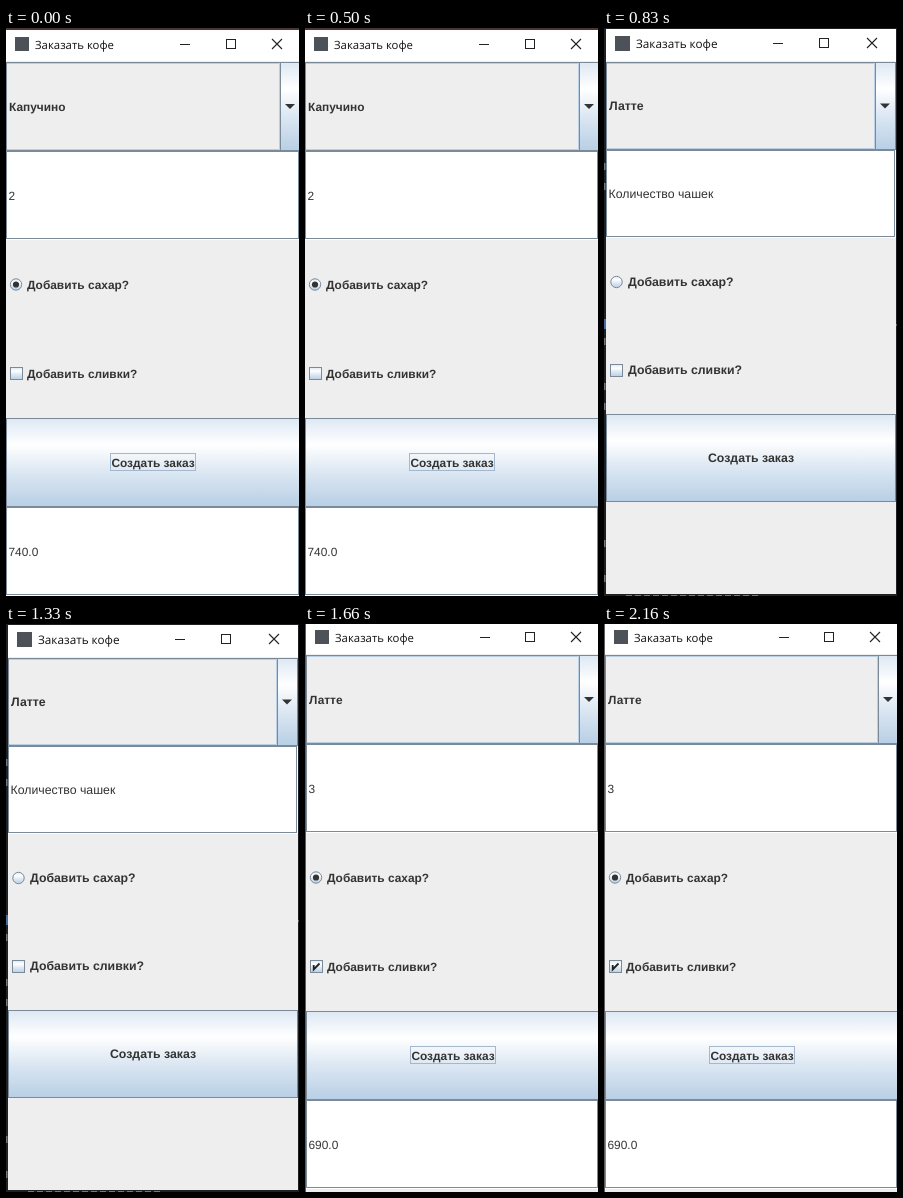
An HTML page that plays this animation: 293x568 px, repeating every 2490 ms.

```html
<!DOCTYPE html>
<html lang="ru">
<head>
<meta charset="utf-8">
<title>Заказать кофе</title>
<style>
html, body { margin: 0; width: 100%; height: 100%; overflow: hidden; background: #eee; }
svg { display: block; width: 293px; height: 568px; }
text { fill: #333; font-family: "Liberation Sans", Arial, sans-serif; text-rendering: geometricPrecision; }
.title { fill: #111; font-family: "Open Sans", "Noto Sans", sans-serif; }
.bold { font-weight: bold; }
.mid { text-anchor: middle; }
.shot { visibility: hidden; animation: show 2490ms step-end infinite; }
.shot:nth-of-type(2) { animation-delay: -1660ms; }
.shot:nth-of-type(3) { animation-delay: -830ms; }
@keyframes show {
  0% { visibility: visible; }
  33.334%, 100% { visibility: hidden; }
}
</style>
</head>
<body>
<svg id="stage" viewBox="0 0 293 568">
  <defs>
    <linearGradient id="ocean" x2="0" y2="1">
      <stop offset="0" stop-color="#dde8f3"/>
      <stop offset=".3" stop-color="#fff"/>
      <stop offset=".6" stop-color="#dde8f3"/>
      <stop offset="1" stop-color="#b8cfe5"/>
    </linearGradient>
  </defs>
</svg>
<script>
const EDGE = '#7a8a99';

const rect = (x, y, w, h, fill) =>
  `<rect x="${x}" y="${y}" width="${w}" height="${h}" fill="${fill}"/>`;
const box = (x, y, w, h, fill, stroke = EDGE) =>
  `<rect x="${x + .5}" y="${y + .5}" width="${w - 1}" height="${h - 1}" fill="${fill}" stroke="${stroke}"/>`;
const path = (d, stroke, width = 1) =>
  `<path d="${d}" fill="none" stroke="${stroke}" stroke-width="${width}"/>`;
const label = (x, y, size, str, cls = '') =>
  `<text x="${x}" y="${y}" font-size="${size}" class="${cls}">${str}</text>`;

// The form is a grid of six equal rows
const rowTop = (s, i) => s.form + i * s.row;
const rowMid = (s, i) => rowTop(s, i) + s.row / 2;
const baseline = (s, i) => rowMid(s, i) + 4.3;

function titleBar(s) {
  const [min, max, close] = s.controls, y = s.controlY;
  return rect(s.left, s.top, s.right - s.left, s.form - s.top - 1, '#fff') +
    rect(...s.icon, '#4d5158') +
    label(s.titleX, y + 4.5, s.size * .955, 'Заказать кофе', 'title') +
    path(`M${min} ${y + .5}h10`, '#222') +
    box(max, y - 5, 10, 10, 'none', '#222') +
    path(`M${close} ${y - 5}l10 10m0 -10l-10 10`, '#222', 1.1);
}

function combo(s) {
  const y = rowTop(s, 0), x = s.arrow;
  return box(s.left, y, s.right - s.left, s.row, '#eee') +
    path(`M${s.left + 1} ${y + 1.5}H${x - 1.5}V${y + s.row - 1.5}H${s.left + 1}`, '#b8cfe5') +
    box(x - 1, y, s.right - x + 1, s.row, 'url(#ocean)') +
    `<path d="M${x + 4} ${rowMid(s, 0) - 2.5}h10l-5 5z" fill="#333"/>` +
    label(s.left + 3, baseline(s, 0), s.size, s.drink, 'bold');
}

// Flush border: dark frame with a white line outside at right and bottom
function field(s, i, str) {
  const y = rowTop(s, i), w = s.right - s.left;
  return rect(s.left, y, w, s.row, '#fff') +
    box(s.left, y, w - 1, s.row - 1, '#fff') +
    label(s.left + 2.5, baseline(s, i), s.size, str);
}

function options(s) {
  const cy = Math.floor(rowMid(s, 3) - 6), cx = s.checkX;
  const dot = (r, look) => `<circle cx="${s.radioX}" cy="${rowMid(s, 2)}" r="${r}" ${look}/>`;
  return dot(5.7, `fill="url(#ocean)" stroke="${EDGE}"`) +
    (s.sugar ? dot(3.1, 'fill="#333"') : '') +
    box(cx, cy, 13, 13, 'url(#ocean)') +
    (s.cream ? path(`M${cx + 3.7} ${cy + 5}v4.5l5.8 -6`, '#222', 1.8) : '') +
    label(s.textX, baseline(s, 2), s.size, 'Добавить сахар?', 'bold') +
    label(s.textX, baseline(s, 3), s.size, 'Добавить сливки?', 'bold');
}

function button(s) {
  return box(s.left, rowTop(s, 4), s.right - s.left, s.row, 'url(#ocean)') +
    (s.total ? box(s.mid - 43, Math.floor(rowMid(s, 4) - 9), 86, 18, 'none', '#a3b8cc') : '') +
    label(s.mid, baseline(s, 4), s.size, 'Создать заказ', 'bold mid');
}

function shot(s) {
  return '<g class="shot">' + rect(0, 0, 293, 568, s.back) + (s.behind || '') +
    rect(s.left, s.top, s.right - s.left, s.bottom - s.top, '#eee') +
    titleBar(s) + combo(s) + field(s, 1, s.cups) + options(s) + button(s) +
    (s.total ? field(s, 5, s.total) : '') + '</g>';
}

// Slivers of the dark editor visible around the second window
const editor = [135, 155, 310, 355, 375, 512, 547].map(y => rect(0, y, 1.5, 7, '#777')).join('') +
  rect(0, 291, 2, 10, '#4a6da0') + rect(292, 296, 1, 2, '#666') +
  `<path d="M22 567.5H155" stroke="#777" stroke-dasharray="6 3"/>`;

const shots = [
  { back: '#4a3733', left: 0, right: 294, top: 2, bottom: 568, size: 11.9,
    icon: [9, 9, 14, 14], titleX: 29, controls: [174, 220, 266], controlY: 16,
    form: 34, row: 89, arrow: 275, drink: 'Капучино', cups: '2',
    radioX: 10, checkX: 4, textX: 21, sugar: true, mid: 147, total: '740.0' },
  { back: '#1f2023', behind: editor, left: 2, right: 292, top: 1, bottom: 566, size: 12.3,
    icon: [11, 8, 15, 15], titleX: 32, controls: [169, 215, 263], controlY: 15,
    form: 34, row: 88, arrow: 272, drink: 'Латте', cups: 'Количество чашек',
    radioX: 12.5, checkX: 6, textX: 24, mid: 147 },
  { back: '#5c5e62', left: 1, right: 294, top: 0, bottom: 568, size: 11.9,
    icon: [10, 6, 14, 14], titleX: 30, controls: [175, 220, 266], controlY: 13,
    form: 31, row: 89, arrow: 275, drink: 'Латте', cups: '3',
    radioX: 11, checkX: 5, textX: 22, sugar: true, cream: true, mid: 148, total: '690.0' }
];

document.getElementById('stage').insertAdjacentHTML('beforeend', shots.map(shot).join(''));
</script>
</body>
</html>
```
